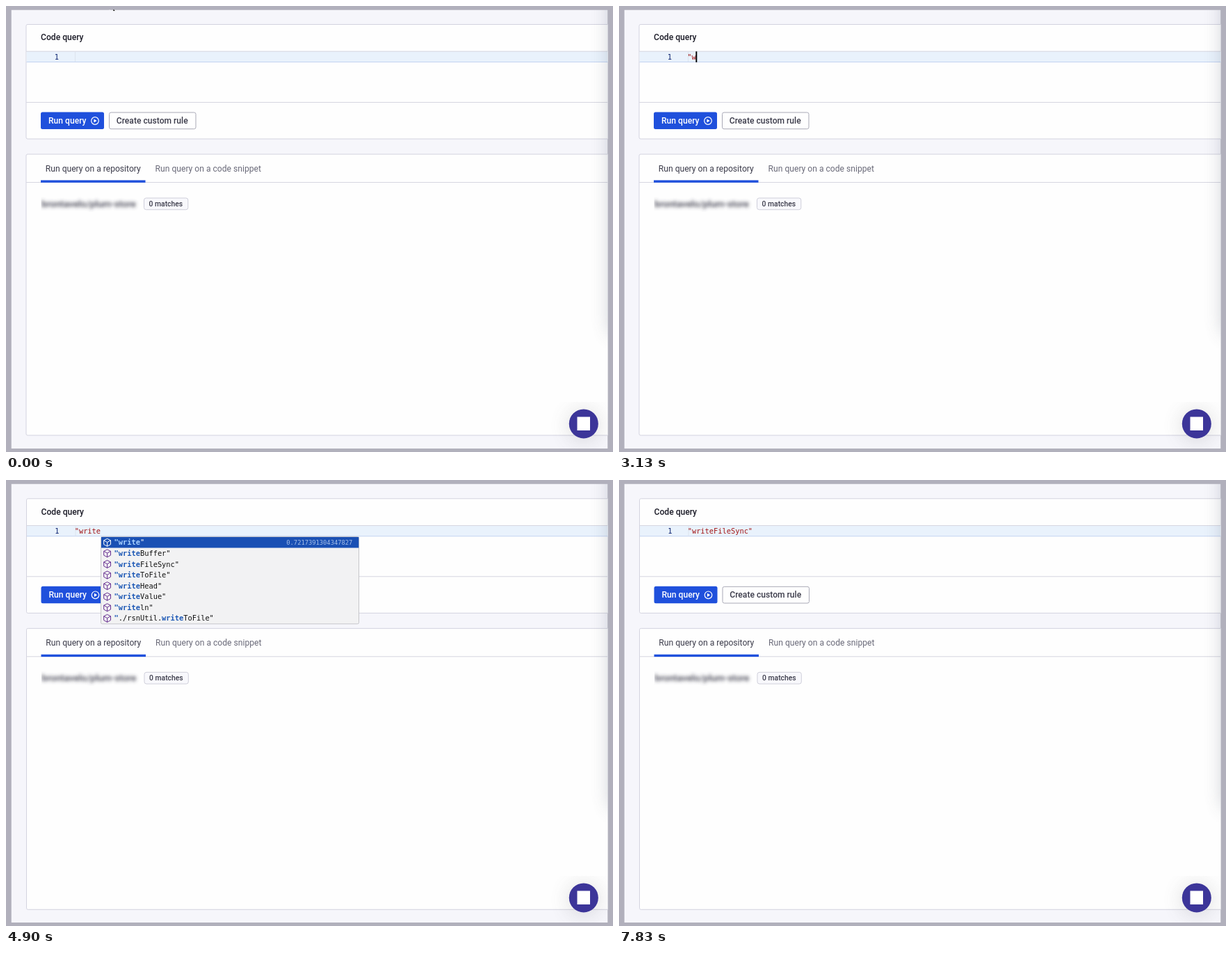
An HTML page that plays this animation: 873 by 641 pixels, repeating every 8 s.

```html
<!DOCTYPE html>
<html lang="en">
<head>
<meta charset="utf-8">
<title>Code query</title>
<style>
  html, body { margin: 0; height: 100%; overflow: hidden; background: #b1b0bc; }
  svg { display: block; width: 100vw; height: 100vh; }
  text { font: 400 12.12px Roboto, sans-serif; fill: #3b3b4a; white-space: pre; }
  .medium { font-weight: 500; }
  .code, .row text { font: 10.35px "DejaVu Sans Mono", monospace; }
  .card { fill: #fefefe; stroke: #d3d3df; }
  .rule { stroke: #d6d6e0; }
  .popup { fill: #f2f2f3; stroke: #c6c6ca; }
  .row text { fill: #111; }
  .row .hit { font-weight: 700; fill: #1b57b5; }
  .row .score { font-size: 8.77px; fill: #a8c0e8; visibility: hidden; }
  .row rect { fill: none; }
  .row path { fill: none; stroke: #652d90; stroke-linejoin: round; }
  .row.on rect { fill: #1a50b4; }
  .row.on text { fill: #fff; }
  .row.on .hit { fill: #a9d2ff; }
  .row.on .score { fill: #a8c0e8; visibility: visible; }
  .row.on path { stroke: #fff; }
</style>
</head>
<body>
<svg viewBox="0 0 873 641">
  <defs>
    <clipPath id="page"><rect x="7.5" y="5.5" width="858" height="630.5"/></clipPath>
    <clipPath id="repo"><rect x="50.5" y="274" width="144" height="22"/></clipPath>
    <filter id="smudge" x="-10%" y="-60%" width="120%" height="220%"><feGaussianBlur stdDeviation="2.6"/></filter>
    <filter id="soft" x="-100%" y="-20%" width="300%" height="140%"><feGaussianBlur stdDeviation="14"/></filter>
  </defs>
  <rect width="873" height="641" fill="#b1b0bc"/>
  <g clip-path="url(#page)">
    <rect x="7.5" y="5.5" width="858" height="630.5" fill="#f6f6fb"/>
    <g id="content">
      <rect class="card" x="29" y="26.5" width="860" height="164.5" rx="2"/>
      <text class="medium" x="50" y="49.3" style="fill:#1b1b27">Code query</text>
      <rect x="29.5" y="65" width="860" height="15.5" fill="#e9f2fc"/>
      <path class="rule" d="M29 65.2H870M29 138.5H870"/>
      <path d="M29.5 80.5H870" stroke="#c3d3f1"/>
      <path d="M99.5 66V80" stroke="#dce4ee"/>
      <text class="code" x="69.8" y="76.8" style="fill:#0b216f">1</text>
      <text class="code" id="typed" x="98.2" y="76.8" style="fill:#a31515"></text>
      <rect id="caret" y="65.3" width="1.9" height="15.6" fill="#000"/>

      <rect x="50" y="152.5" width="91" height="24.5" rx="2.5" fill="#1f50dc"/>
      <text class="medium" x="61" y="168.8" style="fill:#fff">Run query</text>
      <circle cx="128" cy="165" r="5.3" fill="none" stroke="#fff" stroke-width="1.2"/>
      <path d="M126.4 162.4V167.6L130.6 165Z" fill="#fff"/>
      <rect x="148.5" y="153" width="124.5" height="23.7" rx="2.5" fill="#fefefe" stroke="#a9a9b6"/>
      <text class="medium" x="158.8" y="168.8">Create custom rule</text>

      <rect class="card" x="29" y="213" width="860" height="404" rx="2"/>
      <path class="rule" d="M29 253.5H870"/>
      <text x="56.8" y="238">Run query on a repository</text>
      <text x="214.6" y="238" style="fill:#6a6a79">Run query on a code snippet</text>
      <rect x="50" y="250.4" width="150.5" height="3.4" fill="#1f50dc"/>
      <g clip-path="url(#repo)">
        <text class="medium" x="51" y="288.5" filter="url(#smudge)" style="font-size:13.6px">brontavelo/plum-store</text>
      </g>
      <rect x="198.5" y="276" width="63.3" height="16.7" rx="3" fill="#f8f8fc" stroke="#cfcfda"/>
      <text class="medium" x="205.6" y="287.9" style="font-size:10.35px">0 matches</text>
    </g>

    <rect x="870" y="-80" width="120" height="550" fill="#50586a" opacity=".33" filter="url(#soft)"/>
    <circle cx="831" cy="603" r="24" fill="#555" opacity=".16" filter="url(#soft)"/>
    <circle cx="830.8" cy="600.4" r="21" fill="#3c3599"/>
    <rect x="821.5" y="590.5" width="18.5" height="19.5" fill="#fff"/>

    <g id="notice">
      <rect class="popup" x="130" y="81.6" width="185.5" height="16.2" rx="2"/>
      <text id="message" x="149.6" y="94.3" style="font:13px Inter,sans-serif;fill:#111"></text>
    </g>
    <g id="list">
      <rect class="popup" x="136.5" y="81.5" width="371" height="125.3" rx="2"/>
    </g>
    <g id="pointer" stroke-linejoin="round">
      <path id="arrow" d="M0 0V14.5L3.3 11.4 5.5 16.5 8.1 15.4 5.9 10.5H10.5Z" fill="#111" stroke="#fff"/>
      <g id="beam" fill="none" stroke-linecap="round">
        <path d="M-2.7-6.6Q0-6.6 0-5V5Q0 6.6-2.7 6.6M2.7-6.6Q0-6.6 0-5M0 5Q0 6.6 2.7 6.6M-1.5 1.6H1.5" stroke="#fff" stroke-width="2.8"/>
        <path d="M-2.7-6.6Q0-6.6 0-5V5Q0 6.6-2.7 6.6M2.7-6.6Q0-6.6 0-5M0 5Q0 6.6 2.7 6.6M-1.5 1.6H1.5" stroke="#111" stroke-width="1.3"/>
      </g>
    </g>
  </g>
</svg>
<script>
const LOOP = 8000, CODE_X = 97.9, CHAR_W = 6.23;
const $ = id => document.getElementById(id);
const show = (id, on) => $(id).style.display = on ? '' : 'none';

// Each suggestion: text before the match, match, text after it, score
const rows = [
  ['', '"write', '"', '0.7217391304347827'],
  ['', '"write', 'Buffer"', '0.0521739130434783'],
  ['', '"write', 'FileSync"', '0.0391304347826087'],
  ['', '"write', 'ToFile"'],
  ['', '"write', 'Head"'],
  ['', '"write', 'Value"'],
  ['', '"write', 'ln"'],
  ['<tspan class="hit">"</tspan>./rsnUtil.', 'write', 'ToFile"'],
];
$('list').innerHTML += rows.map(([before, match, after, score = ''], i) => `
  <g class="row" transform="translate(0 ${82 + i * 15.57})">
    <rect x="137" width="370.3" height="15.5"/>
    <path d="M145.6 2.3L150.5 4.8V10.6L145.6 13.3 140.7 10.6V4.8ZM140.7 4.8L145.6 7.5 150.5 4.8M145.6 7.5V13.3"/>
    <text x="155.6" y="11.4">${before}<tspan class="hit">${match}</tspan>${after}</text>
    <text class="score" x="498.3" y="11" text-anchor="end">${score}</text>
  </g>`).join('');
const rowNodes = document.querySelectorAll('.row');

const blinks = [930, 1430, 1930, 2430, 2800, 4560, 5100, 5560, 6100, 6560, 7100, 7830];
const keys = [2800, 3130, 3645, 3800, 3930, 4060];
const passed = (times, t) => times.filter(x => t >= x).length;

function pointerAt(t) {
  if (t >= 1430) return [119.8, 73.6];
  if (t >= 1400) return [112, 75.5];
  if (t >= 800) return [104, 77];
  const p = Math.min(1, Math.max(0, (t - 30) / 600));
  const e = p * p * (3 - 2 * p);
  return [149 - 45 * e, -8.5 + 86.5 * e];
}

function draw(now) {
  const t = now % LOOP;
  const text = t >= 7330 ? '"writeFileSync"' : '"write'.slice(0, passed(keys, t));
  $('typed').textContent = text;
  $('caret').setAttribute('x', CODE_X + text.length * CHAR_W);
  show('caret', passed(blinks, t) % 2);
  $('content').setAttribute('transform', t >= 4160 ? 'translate(.5 .3)' : '');

  const loading = t >= 4730;
  show('notice', t >= 3960 && t < 4700 || loading && t < 4900);
  $('notice').setAttribute('transform', loading ? 'translate(6.3 0)' : '');
  $('message').textContent = loading ? 'Loading...' : 'No suggestions.';

  show('list', t >= 4900 && t < 7330);
  const selected = passed([6700, 6900], t);
  rowNodes.forEach((row, i) => row.classList.toggle('on', i === selected));

  const [x, y] = pointerAt(t);
  $('pointer').setAttribute('transform', `translate(${x} ${y})`);
  show('pointer', t < 2860);
  show('arrow', y < 65);
  show('beam', y >= 65);
  requestAnimationFrame(draw);
}
draw(performance.now());
</script>
</body>
</html>
```
